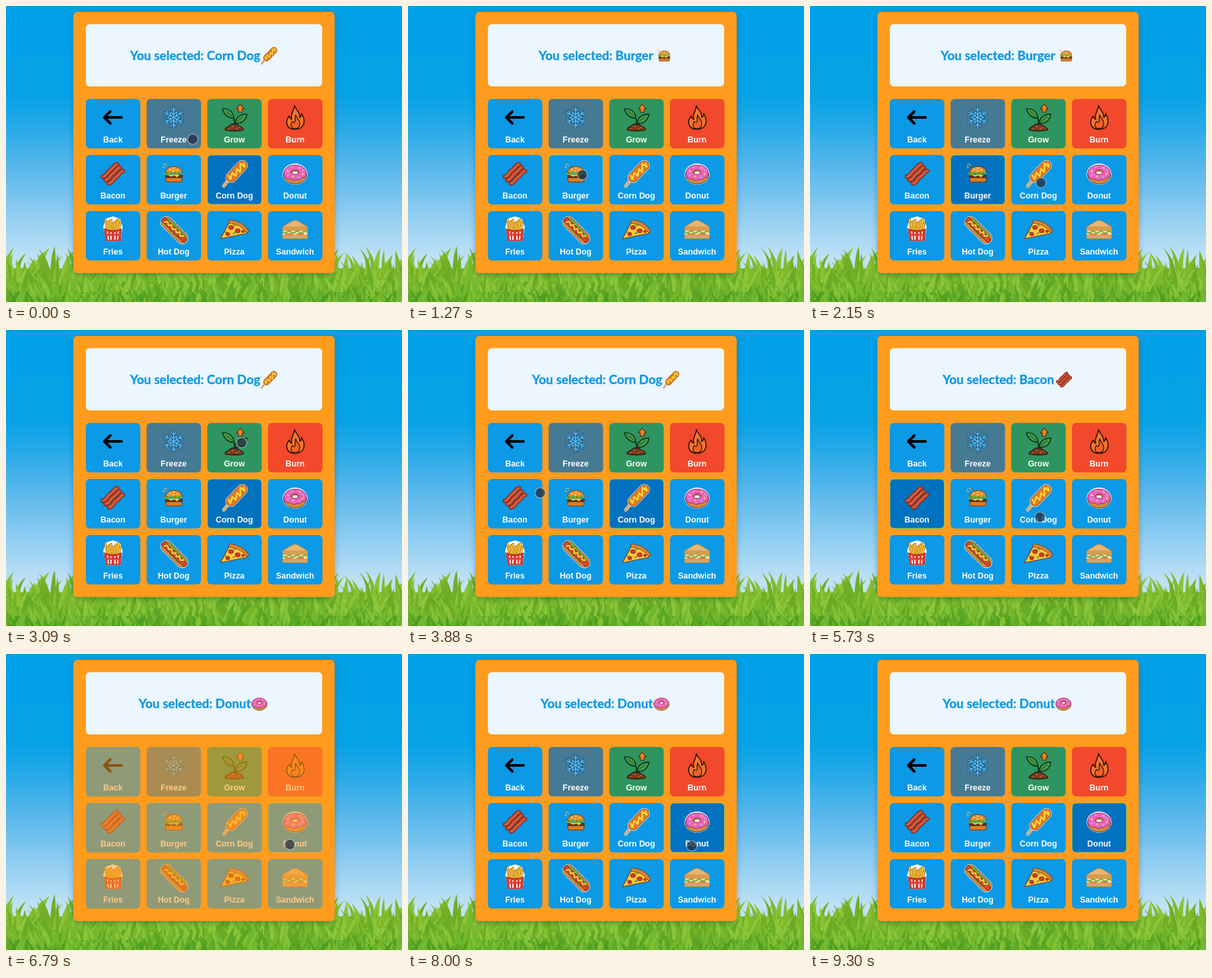
An HTML page for the animation above (9330 ms loop, 600 px wide and 449 px high).

```html
<!DOCTYPE html>
<html lang="en">
<head>
<meta charset="utf-8">
<title>Food picker</title>
<style>
  html, body { margin: 0; width: 100%; height: 100%; overflow: hidden; background: #02a0e7; }
  svg { display: block; width: 600px; height: 449px; }
  .label { font: bold 12.4px "Liberation Sans", Arial, sans-serif; fill: #fff; text-anchor: middle; }
  .message { font: 700 19px Lato, "Open Sans", sans-serif; fill: #0c99e3; stroke: #0c99e3; stroke-width: .35px; }
  .panel { filter: drop-shadow(0 3px 4px rgba(0, 40, 60, .3)); }
</style>
</head>
<body>
<svg id="stage" viewBox="0 0 600 449"></svg>
<script>
const LOOP = 9330;
const BLUE = '#0c99e6', DARK = '#0072bf';

// Small drawing helpers returning SVG markup
const path = (d, fill, stroke = 'none', width = 1) =>
  `<path d="${d}" fill="${fill}" stroke="${stroke}" stroke-width="${width}" stroke-linecap="round" stroke-linejoin="round"/>`;
const line = (d, stroke, width) => path(d, 'none', stroke, width);
const lines = (d, ...pairs) => pairs.map(([color, width]) => line(d, color, width)).join('');
const oval = (x, y, rx, ry, fill, stroke = 'none', width = 1) =>
  `<ellipse cx="${x}" cy="${y}" rx="${rx}" ry="${ry}" fill="${fill}" stroke="${stroke}" stroke-width="${width}"/>`;
const box = (x, y, w, h, r, fill, more = '') =>
  `<rect x="${x}" y="${y}" width="${w}" height="${h}" rx="${r}" fill="${fill}" ${more}/>`;
const group = (transform, body) => `<g transform="${transform}">${body}</g>`;
const range = n => [...Array(n).keys()];

let seed = 7;
const random = (a = 0, b = 1) => {
  seed = (seed * 16807) % 2147483647;
  return a + (b - a) * seed / 2147483647;
};

const snowArm = 'M0 0V-16M-4-14L0-10 4-14M-4-8L0-4 4-8';
const strip = 'M-11 9C-5 8-5 2 0-1S5-8 10-10';
const leftLeaf = 'M-1 1C-9 2-16-5-18-13C-8-14-1-8-1 1Z';
const rightLeaf = 'M1 8C3-1 10-5 19-5C18 5 9 11 1 8Z';
const flame = 'M-1-18C2-10 8-8 7 0C9-1 10-3 10-6C18 8 12 18 0 18C-13 18-16 7-9-2C-8 1-7 2-5 3C-8-6-1-9-1-18Z';
const dog = 'M-5 6L12-12';
const bun = 'M-11-11L13 13';

const icons = {
  Back: lines('M13 0H-12M-4-9L-13 0-4 9', ['#000', 4]),
  Freeze: [['#173b59', 3], ['#4fb9f5', 1.7]].map(([color, width]) =>
    range(6).map(i => group(`rotate(${i * 60})`, line(snowArm, color, width))).join('')).join(''),
  Grow: path('M-14 19C-14 15-9 15-7 12C-3 9 3 9 6 12C9 14 14 15 14 19C7 21-7 21-14 19Z', '#7a3c20', '#26150e', 1.3)
    + lines('M0 11C1 7 0 3-1 1M0 10Q0 9 1 8', ['#123818', 2])
    + path(leftLeaf, '#3f9d4a', '#10280f', 1.4) + path(rightLeaf, '#3f9d4a', '#10280f', 1.4)
    + lines('M-3-1L-12-9M4 6L13-1', ['#183c18', 1])
    + path('M9-20L15-13H12V-8H6V-13H3Z', '#ff7f20', '#42220e', 1.1)
    + lines('M-9 17h1M-3 14h1M3 17h1M7 15h1', ['#c77d48', 1.3]),
  Burn: path(flame, '#f2762a', '#1e0d08', 1.5)
    + path('M1-4C2 2 8 4 7 10C7 15 4 17 0 17C-6 17-8 11-4 6C-2 9-1 8 0 6C1 3-1 1 1-4Z', '#f2602d', '#1e0d08', 1.2),
  Bacon: [[-4, -4], [0, 1], [5, 6]].map(([x, y]) => group(`translate(${x} ${y})`,
    lines(strip, ['#5c2018', 7], ['#bd4029', 5.8], ['#dd8560', 1.2]))).join(''),
  Burger: path('M-12-1C-12-14 13-14 13-1Z', '#e8912d', '#70350f', 1)
    + box(-12, 6, 25, 7, 3, '#d97e25', 'stroke="#70350f"')
    + box(-13, 2, 27, 5, 2, '#60301c')
    + line('M-13 0q3 3 6 0t6 0 6 0 7 0', '#63b52f', 2.5)
    + path('M-9 2H9L5 6 1 3-4 5Z', '#ffc933')
    + lines('M-6-6h1M0-8h1M5-5h1M-1-4h1', ['#fff0bd', 1.5])
    + lines('M-14-9l-2-1M-11-12l-1-2M-15-14h1', ['#f3b047', 1.4]),
  'Corn Dog': lines('M-9 10L-16 19', ['#fff', 5], ['#a86b32', 3.6], ['#e6b870', 2.2])
    + lines(dog, ['#fff', 16.5], ['#8a3b12', 15], ['#e07a23', 13.6])
    + line('M-9 3L-6 9-3-1 2 4 4-7 9-2 9-15 16-10 14-16', '#ffd83d', 2.3),
  Donut: oval(0, 1, 18.8, 16, '#fff') + oval(0, 2, 17.5, 14, '#d48a3e', '#5d2b20', 1)
    + path('M-17 0C-17-17 17-17 17 0C17 5 14 7 11 6C8 11 4 9 2 9C-2 13-6 8-9 8C-14 9-17 5-17 0Z', '#f062bf', '#8b2d69', 1)
    + oval(0, -2, 6, 3.6, '#b9742f', '#8b2d69', 1) + oval(0, -1, 4, 2, '#e9eef2')
    + lines('M-12-4l2 1M6-9l2 1M-4 5l2-1M11 2l1-2', ['#fff06a', 1.4])
    + lines('M-6-9l2-1M11-5l2 1M5 5l2 1M-12 3l2-1', ['#6bd7ff', 1.4]),
  Fries: path('M-14-4L-10-16 0-19 10-16 14-4 11 17H-10Z', '#fff', '#fff', 1.5)
    + range(9).map(i => lines(`M${(i - 4) * 1.9} 4L${(i - 4) * 2.8} ${-15 + i * 5 % 7}`,
      ['#8d5011', 3.8], ['#ffc83b', 2.6])).join('')
    + path('M-13-1Q0 5 13-1L11 17H-10Z', '#e33a32', '#8e201d', 1)
    + lines('M-8 4L-7 15M-3 5V15M3 5V15M8 4L7 15', ['#fff', 1.8])
    + line('M-10 8H10', '#e33a32', 3),
  'Hot Dog': lines(bun, ['#fff', 18.5], ['#7d3b16', 17], ['#dc8d3c', 15.5])
    + lines('M-12-12l5 1 0 4 5 1 0 5 5 1 0 4 5 1 0 4 5 1', ['#3d8f2b', 9.5], ['#75c13d', 7.5])
    + lines('M-14-14L16 16', ['#7e2119', 8], ['#d24a2d', 6.4])
    + line('M-14-11L-9-12-8-6-3-7-2 0 3-1 4 5 9 4 10 10 15 10', '#ffdb3d', 1.8),
  Pizza: path('M-21 14L-6-14Q13-11 21 2L18 6Z', '#ffc53d', '#7c3614', 1.2)
    + lines('M-6-12Q11-10 19 2', ['#7c3614', 5.5], ['#d88735', 4])
    + [[-5, -3, 3.7], [5, 2, 3.8], [-10, 7, 3], [13, 3, 2]].map(([x, y, r]) => oval(x, y, r, r * .8, '#d43c25', '#8e2317')).join('')
    + lines('M-1-7l3 1M-2 6l3-1M-14 4l2 0', ['#4d972d', 1.7]),
  Sandwich: path('M-19-4L-4-13Q0-15 4-13L19-4Z', '#e8b66f', '#b47c40', .8)
    + box(-19, -4, 38, 6, 1, '#d99b50') + box(-19, 8, 38, 6, 1, '#dca45c', 'stroke="#b47c40" stroke-width=".6"')
    + box(-19, 2, 38, 6, 1, '#f1dfb1')
    + line('M-18 4q3 3 6 0t6 0 6 0 6 0 6 0 6 0', '#73ad3e', 2)
    + lines('M-14 7H-4M3 7H13', ['#d55a3c', 1.5]),
};

const names = Object.keys(icons);
const baseColors = names.map((_, i) => ['', '#467a94', '#2e9560', '#f2482c'][i] || BLUE);
const iconId = name => name.replace(' ', '');

function grass() {
  const rows = [
    [418, 24, 55, ['#6fae26', '#7fba2c', '#8bc233']],
    [434, 22, 42, ['#68aa26', '#7ab82c', '#8dc63a']],
    [450, 20, 38, ['#5ca624', '#72b62e', '#84c236']],
    [464, 20, 36, ['#4d9f21', '#5fad2a', '#74bb33']],
  ];
  let blades = '<rect y="398" width="600" height="51" fill="url(#ground)"/>';
  for (const [base, low, high, colors] of rows) {
    for (let x = -15; x < 615; x += random(2, 5)) {
      const y = base - low - (high - low) * random() ** 1.5;
      const lean = random(-20, 20), w = random(3, 5);
      blades += path(`M${x - w} ${base}Q${x - w} ${y + 14} ${x + lean} ${y}Q${x + w} ${y + 18} ${x + w} ${base}Z`,
        colors[Math.floor(random(0, 3))]);
    }
  }
  return blades;
}

function button(name, i) {
  const x = 121 + i % 4 * 92, y = 141 + Math.floor(i / 4) * 85;
  return `<g class="button" transform="translate(${x} ${y})">
    ${box(0, 0, 82.5, 75, 6, baseColors[i])}
    <use href="#${iconId(name)}" x="41" y="28"/>
    <text class="label" x="41" y="66">${name}</text></g>`;
}

const stage = document.getElementById('stage');
stage.innerHTML = `<defs>
  <linearGradient id="sky" x2="0" y2="1">
    <stop stop-color="#00a0e7"/><stop offset=".3" stop-color="#06a2e7"/>
    <stop offset=".4" stop-color="#24a9e8"/><stop offset=".55" stop-color="#5ab8ec"/>
    <stop offset=".85" stop-color="#c0e1f6"/>
  </linearGradient>
  <linearGradient id="ground" x2="0" y2="1">
    <stop stop-color="#78b92c"/><stop offset="1" stop-color="#459c20"/>
  </linearGradient>
  ${names.map(name => `<g id="${iconId(name)}">${icons[name]}</g>`).join('')}
  </defs>
  <rect width="600" height="449" fill="url(#sky)"/>${grass()}
  ${box(102, 9, 396, 396, 6, '#ff9c1e', 'class="panel"')}
  ${box(121, 27.5, 358, 94.5, 6, '#ebf6fe')}
  <text id="message" class="message" y="82"></text><use id="choice"/>
  ${names.map(button).join('')}
  <circle id="pointer" r="7.8" fill="#222c40" fill-opacity=".74" stroke="#c3d1da" stroke-opacity=".55" stroke-width="1.6"/>`;

const [message, choice, pointer] = ['message', 'choice', 'pointer'].map(id => document.getElementById(id));
const buttons = [...stage.querySelectorAll('.button')];

// Each choice locks the keypad briefly, then stays highlighted
const picks = [
  { name: 'Corn Dog', at: 0, lock: 0, free: 0, textX: 188, iconX: 398 },
  { name: 'Burger', at: 1230, lock: 1280, free: 2000, textX: 198, iconX: 388 },
  { name: 'Corn Dog', at: 2230, lock: 2260, free: 2960, textX: 188, iconX: 398 },
  { name: 'Bacon', at: 4390, lock: 4420, free: 5570, textX: 201, iconX: 385 },
  { name: 'Donut', at: 6350, lock: 6380, free: 7900, textX: 201, iconX: 384 },
];
// time, x, y
const route = [
  [0, 283, 202], [950, 264, 256], [1400, 264, 256], [2100, 350, 268], [2450, 350, 268],
  [3090, 357, 171], [4250, 151, 271], [4800, 151, 271], [6250, 430, 289], [6800, 430, 289],
  [8000, 430, 291], [LOOP, 430, 291],
];
const clamp = v => Math.max(0, Math.min(1, v));

function movePointer(t) {
  const i = route.findIndex(p => p[0] > t);
  const [t0, x0, y0] = route[i - 1], [t1, x1, y1] = route[i];
  const u = (t - t0) / (t1 - t0), k = u * u * (3 - 2 * u);
  pointer.setAttribute('cx', x0 + (x1 - x0) * k);
  pointer.setAttribute('cy', y0 + (y1 - y0) * k);
  pointer.setAttribute('opacity', 1 - clamp((t - 8500) / 300));
}

function draw() {
  const t = performance.now() % LOOP;
  const pick = picks.findLast(p => p.at <= t);
  const locked = t >= pick.lock && t < pick.free;
  message.textContent = 'You selected: ' + pick.name;
  message.setAttribute('x', pick.textX);
  choice.setAttribute('href', '#' + iconId(pick.name));
  choice.setAttribute('transform', `translate(${pick.iconX} 75) scale(.66)`);

  buttons.forEach((node, i) => {
    const active = names[i] === pick.name;
    const fade = locked ? (active ? clamp((t - pick.lock) / 300) : 1) : 0;
    node.setAttribute('opacity', 1 - .545 * fade);
    const face = node.firstElementChild;
    face.setAttribute('fill', active && t >= pick.free ? DARK : baseColors[i]);
    face.setAttribute('stroke', active ? '#a9c94a' : 'none');
  });
  movePointer(t);
  requestAnimationFrame(draw);
}
draw();
</script>
</body>
</html>
```
